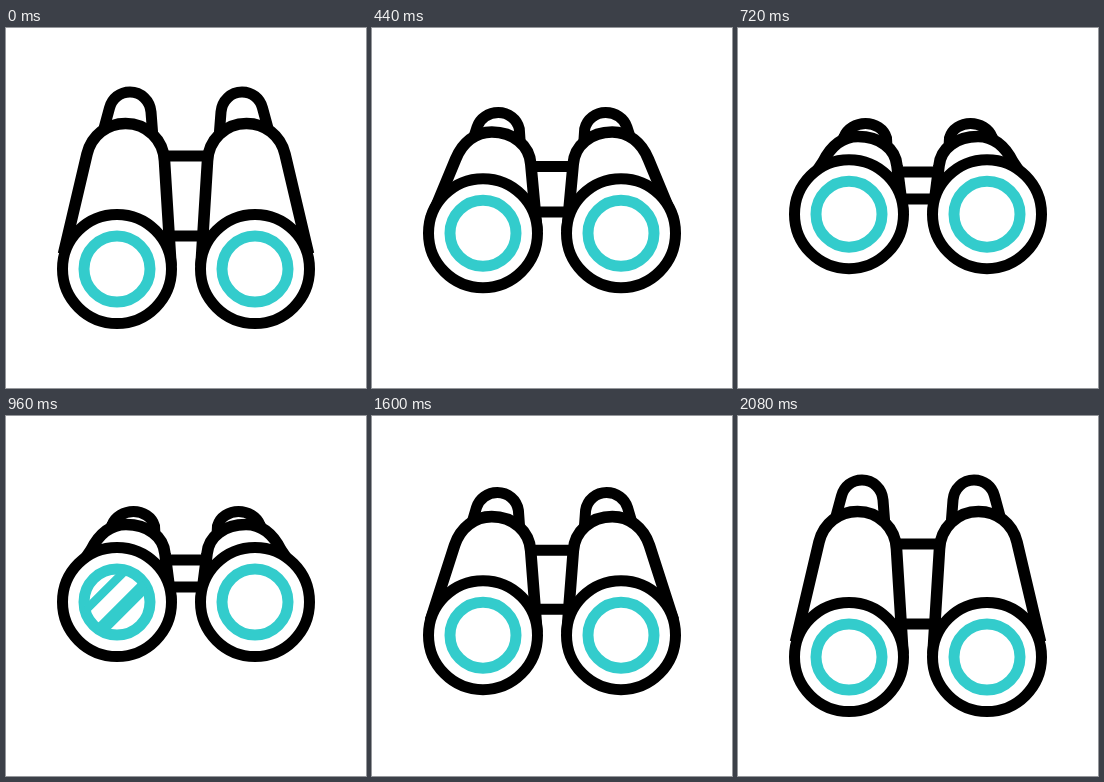
Recreate the animation shown at these times as an HTML page. Size 360x360 px, loop 2.2 s.

```html
<!DOCTYPE html>
<html lang="en">
<head>
<meta charset="utf-8">
<title>Binoculars</title>
<style>
  html, body { margin: 0; width: 100%; height: 100%; overflow: hidden; background: #fff; }
  svg { display: block; width: 100vw; height: 100vh; }
  .ink { fill: #fff; stroke: #000; stroke-width: 11; }
  #body { stroke-width: 11.6; }
  .ring { fill: none; stroke: #3cc; stroke-width: 11; }
  #bands { fill: #3cc; }
</style>
</head>
<body>
<svg viewBox="0 0 360 360">
  <defs>
    <clipPath id="lenses">
      <circle cx="111" r="33"/>
      <circle cx="249" r="33"/>
    </clipPath>
    <g id="half">
      <path id="arch" class="ink"/>
      <path id="body" class="ink"/>
      <g class="front">
        <circle class="ink" cx="111" r="54.5"/>
        <circle class="ring" cx="111" r="33"/>
      </g>
    </g>
  </defs>
  <path id="bars" class="ink"/>
  <use href="#half"/>
  <use href="#half" transform="matrix(-1 0 0 1 360 0)"/>
  <g class="front" clip-path="url(#lenses)">
    <!-- two diagonal bands, placed by their x on the lens axis -->
    <path id="bands" d="M-64 40h12l80-80h-12zM-33 40h19l80-80h-19z"/>
  </g>
</svg>
<script>
const LOOP = 2200;
const $ = id => document.getElementById(id);
const front = document.querySelectorAll('.front');
const mix = (a, b, p) => a + (b - a) * p;
const clamp = x => Math.min(1, Math.max(0, x));

// Cubic Bezier easing with flat ends: control points (x1, 0) and (x2, 1).
function ease(x, x1, x2) {
  let lo = 0, hi = 1;
  for (let i = 0; i < 24; i++) {
    const s = (lo + hi) / 2, r = 1 - s;
    if (3 * s * r * r * x1 + 3 * s * s * r * x2 + s ** 3 < x) lo = s;
    else hi = s;
  }
  return lo * lo * (3 - 2 * lo);
}

const quadInOut = x => x < .5 ? 2 * x * x : 1 - 2 * (1 - x) ** 2;

// Blends two paths that share the same commands.
function morph(from, to) {
  const ends = to.match(/[\d.]+/g);
  return p => {
    let i = 0;
    return from.replace(/[\d.]+/g, n => mix(+n, +ends[i++], p).toFixed(2));
  };
}

const shapes = {
  arch: morph('M97 104L103.5 80C106 70.5 114 64 124 64C135 64 144 72.5 145 84L147 110',
              'M104 113L106 109C109 101 118 95.5 127.5 95.5C137 95.5 146 101 148.5 110L149 119'),
  body: morph('M57.5 226L81 126C85.5 107.5 101 95.5 119.5 95.5C141 95.5 157.5 112 158.5 133L165 238',
              'M60 171L85 134C93 118 105 108.5 120 108.5C141 108.5 157.5 120 159 138L165 185'),
  bars: morph('M158 128L202 128M158 208L202 208',
              'M158 144L202 144M158 171L202 171')
};

function draw(t) {
  const tilt = t < 1400
    ? ease(clamp((t - 200) / 560), .447, .195)
    : 1 - ease(clamp((t - 1400) / 560), .4, .114);
  for (const id in shapes) $(id).setAttribute('d', shapes[id](tilt));
  const y = mix(241, 186, tilt);
  front.forEach(g => g.setAttribute('transform', `translate(0 ${y})`));

  const sweep = clamp((t - 780) / 540);
  $('bands').setAttribute('transform', `translate(${mix(47, 309, quadInOut(sweep))} 0)`);
  $('bands').style.display = sweep > 0 && sweep < 1 ? '' : 'none';
}

function tick() {
  draw(performance.now() % LOOP);
  requestAnimationFrame(tick);
}
tick();
</script>
</body>
</html>
```
